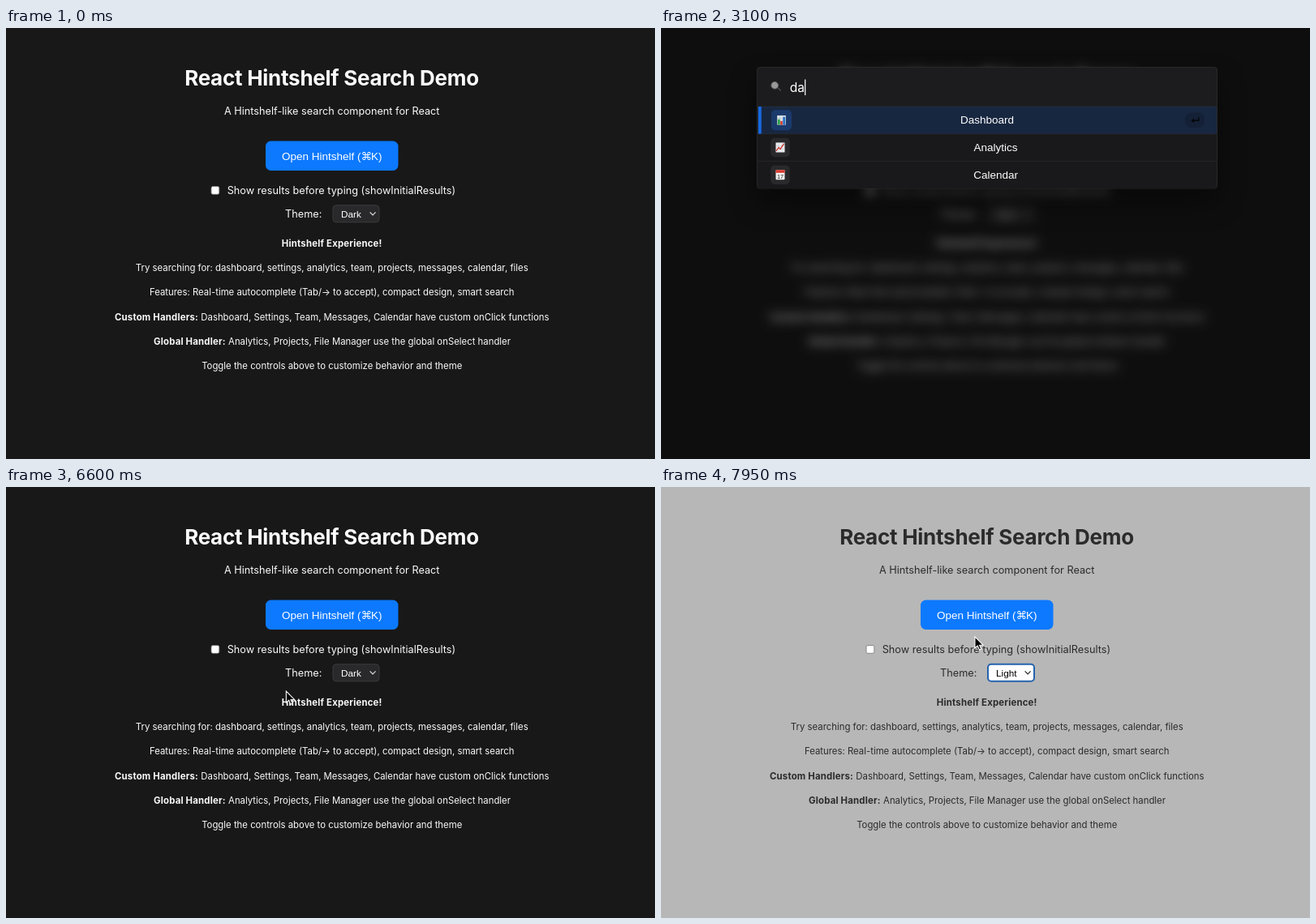
Recreate the animation shown at these times as an HTML page. Size 800x532 px, loop 8 s.

```html
<!DOCTYPE html>
<html lang="en">
<head>
<meta charset="utf-8">
<title>Search demo</title>
<style>
  html, body { margin: 0; width: 100%; height: 100%; overflow: hidden; background: #181818; }
  svg { display: block; width: 100vw; height: 100vh; }
  text { font-family: Inter, sans-serif; white-space: pre; }
  .arial { font-family: "Liberation Sans", Arial, sans-serif; }
  .symbol { font-family: "DejaVu Sans", sans-serif; }
  .mid { text-anchor: middle; }
  .end { text-anchor: end; }
  .title { font-size: 26px; font-weight: 700; letter-spacing: -.26px; }
  .body { font-size: 12.72px; }
  .small { font-size: 11.36px; }
  .bold { font-weight: 700; letter-spacing: .2px; }
  .label { font-size: 13.5px; }
  .query { font-size: 15.6px; }
  #shadow { filter: drop-shadow(0 17px 17px rgba(0, 0, 0, .42)); }
</style>
</head>
<body>
<svg viewBox="0 0 800 532">
  <defs>
    <clipPath id="clip"><rect class="panel" x="118" y="48" width="568" rx="4"/></clipPath>
    <g id="chart">
      <rect x="-5.3" y="-5.8" width="10.6" height="11.6" fill="#dbe4e8"/>
      <path d="M-5.3-2H5.3M-5.3 2H5.3M-2-5.8V5.8M2-5.8V5.8" stroke="#a9bac4" stroke-width=".6"/>
      <path d="M-3.2 5.8V-1" stroke="#31a24c" stroke-width="2.8"/>
      <path d="M0 5.8V1" stroke="#d8392f" stroke-width="2.6"/>
      <path d="M3.2 5.8V-4" stroke="#2c72c7" stroke-width="2.8"/>
    </g>
    <g id="trend">
      <rect x="-5.5" y="-6" width="11" height="12" fill="#eef0f2"/>
      <path d="M-5.5-2H5.5M-5.5 2H5.5M-2-6V6M2-6V6" stroke="#c3ccd2" stroke-width=".6"/>
      <path d="M-5 4.5L-2 0L0 2L4.7-4.8" fill="none" stroke="#d0382f" stroke-width="1.3"/>
    </g>
    <g id="date">
      <rect x="-5.5" y="-6" width="11" height="12" rx="1" fill="#f2f2f2"/>
      <path d="M-5.5-4.2H5.5" stroke="#d83a30" stroke-width="3.4"/>
      <text class="arial mid" y="4.6" font-size="7.4" fill="#222">17</text>
    </g>
    <g id="folder">
      <path d="M-5.5 5V-4.5H-1.5L0-3H5.5V5Z" fill="#3f94cf"/>
      <path d="M-5.5 5V-1H5.5V5Z" fill="#6cc0ee"/>
    </g>
  </defs>

  <rect id="bg" width="800" height="532"/>
  <g id="page">
    <text class="title mid" x="401.5" y="71">React Hintshelf Search Demo</text>
    <text class="body mid" x="401.7" y="107">A Hintshelf-like search component for React</text>
    <rect x="320" y="139.5" width="163.5" height="36.5" rx="6.5" fill="#0c79ff"/>
    <text class="arial label" x="340" y="163" fill="#fff">Open Hintshelf (<tspan class="symbol" x="437.4">⌘</tspan><tspan x="450">K)</tspan></text>
    <rect x="253" y="195.5" width="9.8" height="9.8" rx="2" fill="#fff" stroke="#777" stroke-width=".8"/>
    <text class="body" x="272.7" y="205.3">Show results before typing (showInitialResults)</text>
    <text class="body" x="344" y="234">Theme:</text>
    <rect id="select" x="403" y="218.8" width="57" height="21" rx="4"/>
    <text id="theme" class="arial" x="413" y="233.5" font-size="11.8"></text>
    <path id="chevron" d="M448.6 227.3L452.1 230.8L455.6 227.3" fill="none" stroke-width="1.2"/>
    <text class="small bold mid" x="401.7" y="269.8">Hintshelf Experience!</text>
    <text class="small mid" x="401.8" y="300">Try searching for: dashboard, settings, analytics, team, projects, messages, calendar, files</text>
    <text class="small mid" x="401.8" y="330.3">Features: Real-time autocomplete (Tab/→ to accept), compact design, smart search</text>
    <text class="small bold" x="134" y="360.7">Custom Handlers:</text>
    <text class="small end" x="669.5" y="360.7">Dashboard, Settings, Team, Messages, Calendar have custom onClick functions</text>
    <text class="small bold" x="182" y="391">Global Handler:</text>
    <text class="small end" x="622" y="391">Analytics, Projects, File Manager use the global onSelect handler</text>
    <text class="small mid" x="401.7" y="421.4">Toggle the controls above to customize behavior and theme</text>
  </g>

  <g id="overlay">
    <rect width="800" height="532" opacity=".4"/>
    <rect id="shadow" class="panel" x="118" y="48" width="568" rx="4" fill="#1c1c1e"/>
    <path d="M143.5 73.5L147.4 77" stroke="#4c4c4c" stroke-width="1.6" stroke-linecap="round"/>
    <circle cx="140.2" cy="70.8" r="4.3" fill="#989898" stroke="#6a6a6a"/>
    <text id="query" class="query" x="158.8" y="79"></text>
    <rect id="caret" y="63.5" width="1.2" height="19.5" fill="#fff"/>
    <g id="rows" clip-path="url(#clip)"></g>
    <rect class="panel" x="118.5" y="48.5" width="567" rx="4" fill="none" stroke="#fff" stroke-opacity=".05"/>
  </g>

  <path id="cursor" d="M0 0V14.2L3.3 11.2L5.5 16.2L7.8 15.2L5.7 10.4H10.2Z" fill="#000" stroke="#fff" stroke-width="1.1"/>
</svg>
<script>
const LOOP = 8000, ROW = 33.7, LIST_TOP = 97;
const OPEN = 1250, CLOSE = 4600, LIGHT = 7830;
const typing = [
  { at: OPEN, text: "", rows: 0 },
  { at: 2480, text: "d", rows: 5 },
  { at: 2950, text: "da", rows: 3 },
  { at: 3500, text: "das", rows: 1 }
];
const results = [["Dashboard", "chart"], ["Analytics", "trend"], ["Calendar", "date"],
  ["Projects", "folder"], ["File Manager", "folder"]];

// Pointer tracks: [time, x, y]
const tracks = [
  [[50, 314, 508], [300, 360, 380], [600, 462, 190], [850, 430, 148], [1050, 385, 152], [2480, 385, 152]],
  [[5050, 212, 225], [5200, 212, 234], [5350, 225, 238], [5500, 300, 160], [5700, 410, 64], [5850, 464, 100],
   [5950, 452, 150], [6200, 300, 195], [6400, 256, 210], [6600, 345, 252], [6850, 435, 225],
   [7000, 400, 152], [7150, 326, 175], [7350, 380, 250], [7600, 425, 229], [7800, 393, 204],
   [7950, 387, 185], [8000, 386, 181]]
];

const $ = id => document.getElementById(id);
const clamp = v => Math.min(1, Math.max(0, v));
const set = (el, attrs) => Object.entries(attrs).forEach(([k, v]) => el.setAttribute(k, v));

function spline(a, b, c, d, u) {
  return b + u / 2 * (c - a + u * (2 * a - 5 * b + 4 * c - d + u * (3 * (b - c) + d - a)));
}

function pointerAt(t) {
  const track = tracks.find(k => t >= k[0][0] && t < k[k.length - 1][0]);
  if (!track) return null;
  const i = track.findIndex(k => k[0] > t) - 1;
  const key = n => track[Math.min(track.length - 1, Math.max(0, n))];
  const [a, b, c, d] = [key(i - 1), key(i), key(i + 1), key(i + 2)];
  if (b[1] === c[1] && b[2] === c[2]) return [b[1], b[2]];
  const u = (t - b[0]) / (c[0] - b[0]);
  return [1, 2].map(n => spline(a[n], b[n], c[n], d[n], u));
}

function rowMarkup([name, icon], i) {
  const top = LIST_TOP + ROW * i, mid = top + ROW / 2 - .1, first = i === 0;
  const size = first ? 25 : 23.5, cx = first ? 148.5 : 147;
  return `<g class="row">
    <rect x="119" y="${top}" width="566" height="${ROW}" fill="${first ? "#182740" : "#19191b"}"/>
    <path d="M119 ${top}H685" stroke="#fff" stroke-opacity=".05"/>
    ${first ? `<rect x="120" y="${top}" width="3.8" height="${ROW}" fill="#1769e0"/>` : ""}
    <rect x="${cx - size / 2}" y="${mid - size / 2}" width="${size}" height="${size}" rx="5" fill="${first ? "#1b3a6c" : "#29292b"}"/>
    <use href="#${icon}" x="${cx}" y="${mid}"/>
    <text class="arial label mid" x="${first ? 402 : 412.6}" y="${mid + 4.5}" fill="#fff">${name}</text>
    ${first ? `<rect x="646" y="${mid - 9.5}" width="24" height="19" rx="8" fill="#142036"/>
    <path d="M662.8 ${mid - 3.5}V${mid + .6}H655" fill="none" stroke="#05070b" stroke-width="1.5"/>
    <path d="M653.2 ${mid + .6}l4-2.8v5.6Z" fill="#05070b"/>` : ""}
  </g>`;
}
$("rows").innerHTML = results.map(rowMarkup).join("");
const rows = document.querySelectorAll(".row");
const panels = document.querySelectorAll(".panel");

function drawPage(t, veil) {
  const light = t >= LIGHT;
  const fade = 1 - (1 - clamp((t - LIGHT) / 300)) ** 2.25;
  const shade = Math.round(24 + 231 * fade);
  set($("bg"), { fill: `rgb(${shade},${shade},${shade})` });
  set($("page"), { fill: light ? "#2b2b2b" : "#fafafa" });
  $("page").style.filter = veil ? `blur(${7 * veil}px) saturate(${1 - .25 * veil})` : "none";
  set($("select"), light
    ? { fill: "#fff", stroke: "#2563ad", "stroke-width": 2 }
    : { fill: "#29292b", stroke: "#3b3b3d", "stroke-width": 1 });
  $("theme").textContent = light ? "Light" : "Dark";
  set($("theme"), { fill: light ? "#000" : "#fff" });
  set($("chevron"), { stroke: light ? "#222" : "#ddd" });
}

function drawOverlay(t, veil) {
  set($("overlay"), { opacity: veil, visibility: veil ? "visible" : "hidden" });
  if (!veil) return;
  const step = typing.filter(s => s.at <= t).pop();
  $("query").textContent = step.text || "Search modules...";
  set($("query"), { fill: step.text ? "#fff" : "#828285" });
  const width = step.text ? $("query").getComputedTextLength() : 0;
  const blink = (t - step.at) % 1000 < 500;
  set($("caret"), { x: 158.8 + width, visibility: blink ? "inherit" : "hidden" });
  panels.forEach(p => set(p, { height: 49 + ROW * step.rows }));
  rows.forEach((row, i) => set(row, { visibility: i < step.rows ? "inherit" : "hidden" }));
  set($("rows"), { opacity: clamp((t - typing[1].at) / 150) });
}

function draw(t) {
  const veil = clamp((t - OPEN) / 200) * clamp(1 - (t - CLOSE) / 150);
  drawPage(t, veil);
  drawOverlay(t, veil);
  const at = pointerAt(t);
  set($("cursor"), at ? { visibility: "visible", transform: `translate(${at})` } : { visibility: "hidden" });
}

const start = performance.now();
function frame() {
  draw((performance.now() - start) % LOOP);
  requestAnimationFrame(frame);
}
frame();
</script>
</body>
</html>
```
